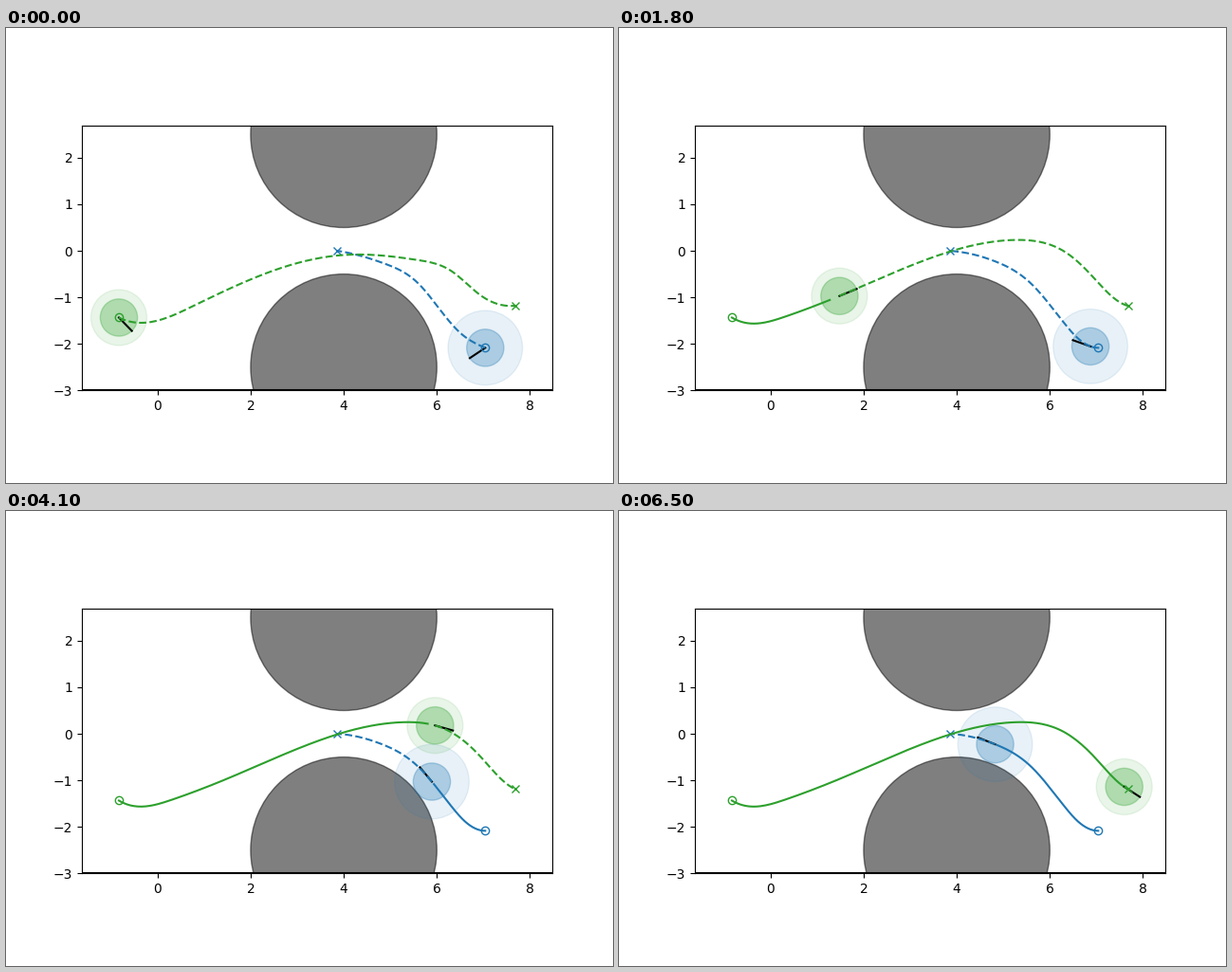
Recreate the animation shown at these times as a matplotlib script. Size 640 by 480 pixels, loop 6.6 s.

```python
import numpy as np
import matplotlib.pyplot as plt
from matplotlib.animation import FuncAnimation
from matplotlib.patches import Circle

FRAMES, INTERVAL = 66, 100
HEADING_LENGTH = 0.4


def spline(points, start_slope, end_slope):
    """Clamped cubic spline through points with increasing x."""
    x, y = np.array(points, float).T
    h = np.diff(x)
    d = np.diff(y) / h
    a = np.eye(len(x))
    b = np.zeros(len(x))
    b[0], b[-1] = start_slope, end_slope
    for i in range(1, len(x) - 1):
        a[i, i - 1:i + 2] = h[i], 2 * (h[i - 1] + h[i]), h[i - 1]
        b[i] = 3 * (h[i] * d[i - 1] + h[i - 1] * d[i])
    m = np.linalg.solve(a, b)

    def evaluate(q):
        q = np.clip(q, x[0], x[-1])
        i = np.clip(np.searchsorted(x, q, side="right") - 1, 0, len(h) - 1)
        t = (q - x[i]) / h[i]
        s = 1 - t
        return (s * s * (1 + 2 * t) * y[i] + t * t * (1 + 2 * s) * y[i + 1]
                + h[i] * t * s * (s * m[i] - t * m[i + 1]))

    return evaluate


def soft_ramp(v, width):
    """Zero for low v, then v itself, with a smooth bend between."""
    return width * np.logaddexp(0, v / width)


def drive(n, speed, delay, pickup, reach, braking):
    """Distance covered: speed up around delay, cruise, ease out at reach."""
    cruise = speed * (soft_ramp(n - delay, pickup) - soft_ramp(-delay, pickup))
    return cruise - soft_ramp(cruise - reach, braking)


class Robot:
    def __init__(self, ax, color, margin, start_x, goal_x, motion, path, first_plan, turn):
        self.start_x, self.goal_x, self.motion = start_x, goal_x, motion
        self.path, self.first_plan = path, first_plan
        self.turn = np.radians(turn)
        self.side = np.sign(goal_x - start_x)
        self.discs = [ax.add_patch(Circle((0, 0), r, color=color, alpha=alpha))
                      for r, alpha in ((margin, 0.1), (0.4, 0.3))]
        self.trail, = ax.plot([], [], color=color)
        self.heading, = ax.plot([], [], color="k")
        self.plan, = ax.plot([], [], "--", color=color)
        ax.plot(start_x, path(start_x), "o", color=color, fillstyle="none")
        ax.plot(goal_x, path(goal_x), "x", color=color)

    def x_at(self, n):
        return self.start_x + self.side * (drive(n, **self.motion) - drive(0, **self.motion))

    def angle(self, n, x):
        ends = np.clip([x - 0.005, x + 0.005], *sorted((self.start_x, self.goal_x)))
        dx, dy = self.side * np.diff(ends)[0], self.side * np.diff(self.path(ends))[0]
        return np.arctan2(dy, dx) + self.turn * np.exp(-n / 4)

    def update(self, n):
        x = self.x_at(n)
        y = float(self.path(x))
        for disc in self.discs:
            disc.center = x, y

        # The trail lags one step behind the robot.
        past = np.linspace(self.start_x, self.x_at(max(n - 1, 0)), 150)
        self.trail.set_data(past, self.path(past))

        a = self.angle(n, x)
        self.heading.set_data([x, x + HEADING_LENGTH * np.cos(a)],
                              [y, y + HEADING_LENGTH * np.sin(a)])

        # The first plan relaxes to the path driven, slowest near the goal.
        ahead = np.linspace(x, self.goal_x, 150)
        u = (ahead - self.start_x) / (self.goal_x - self.start_x)
        w = np.exp(-n / (4.6 + 14 * u ** 8))
        self.plan.set_data(ahead, (1 - w) * self.path(ahead) + w * self.first_plan(ahead))
        return [*self.discs, self.trail, self.heading, self.plan]


fig, ax = plt.subplots(figsize=(6.4, 4.8), dpi=100)
ax.set_aspect("equal")
ax.set(xlim=(-1.625, 8.48), ylim=(-3, 2.7),
       xticks=range(0, 9, 2), yticks=range(-3, 3))
for cy in (2.5, -2.5):
    ax.add_patch(Circle((4, cy), 2, color="k", alpha=0.5))
ax.axhline(-3, color="k")

blue = Robot(
    ax, "C0", 0.8, start_x=7.04, goal_x=3.86, turn=34,
    motion=dict(speed=0.0445, delay=15.2, pickup=3, reach=3.18, braking=0.1),
    path=spline([(3.86, 0), (4.81, -0.22), (5.57, -0.68), (6.22, -1.44),
                 (6.6, -1.88), (7.04, -2.085)], -0.05, 0),
    first_plan=spline([(3.86, 0), (4.89, -0.28), (5.6, -0.7), (6.11, -1.32),
                       (6.52, -1.78), (7.04, -2.085)], -0.15, -0.42))
green = Robot(
    ax, "C2", 0.6, start_x=-0.83, goal_x=7.69, turn=-15,
    motion=dict(speed=0.214, delay=7, pickup=2.7, reach=8.5, braking=1.35),
    path=spline([(-0.83, -1.435), (0.3, -1.42), (1.46, -0.98), (4, 0.03),
                 (5.3, 0.25), (6.32, 0.03), (6.93, -0.47), (7.69, -1.19)], -0.6, -0.45),
    first_plan=spline([(-0.83, -1.435), (0.8, -1.17), (2.65, -0.37), (4, -0.09),
                       (5.6, -0.2), (6.32, -0.44), (6.93, -0.95), (7.69, -1.18)], -0.5, 0.1))


def update(n):
    return blue.update(n) + green.update(n)


anim = FuncAnimation(fig, update, frames=FRAMES, interval=INTERVAL,
                     repeat=True, repeat_delay=0)
plt.show()
```
